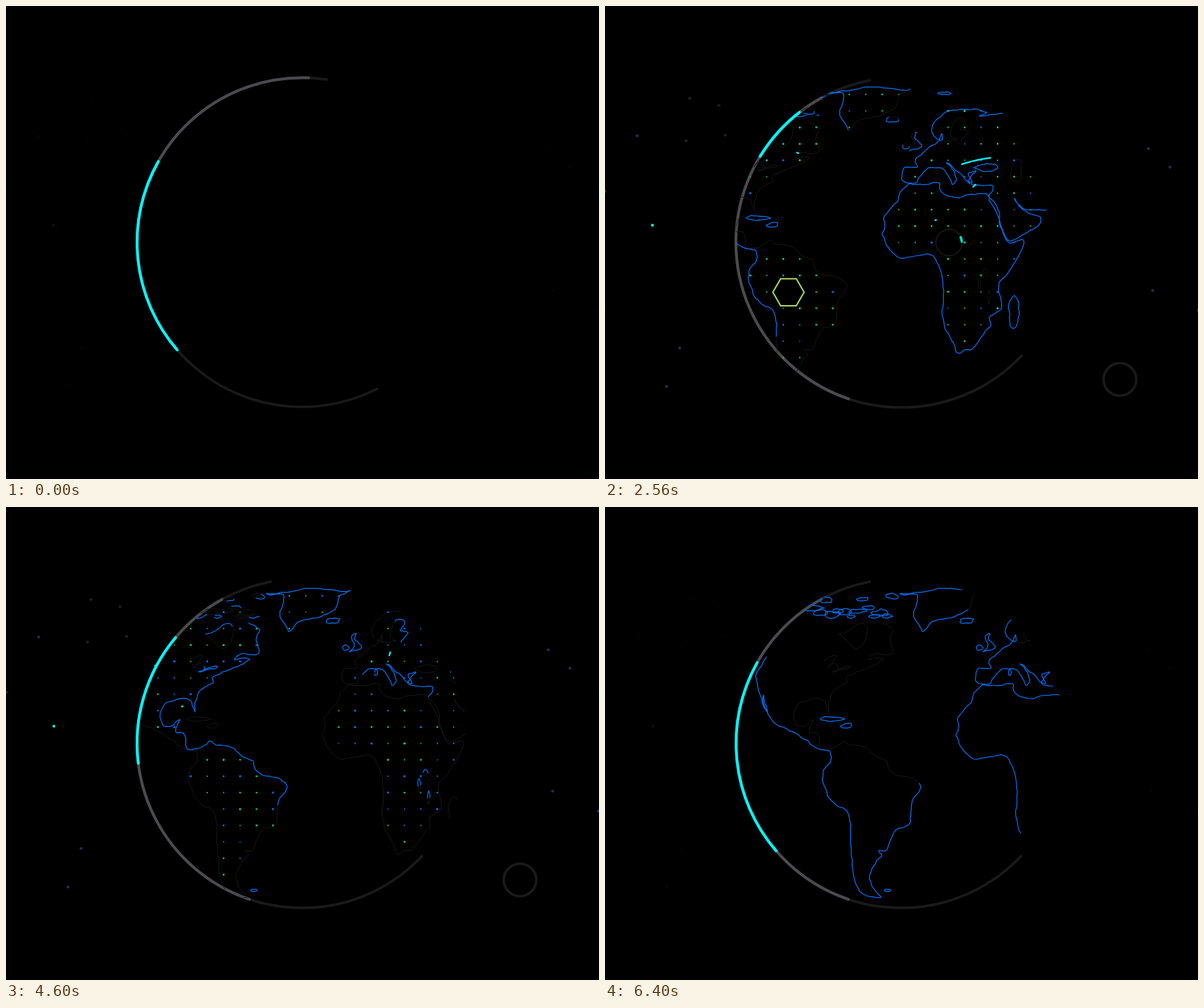
An HTML page with a canvas for the animation above (6.44 s loop, 837 px wide and 669 px high).

```html
<!DOCTYPE html>
<html lang="en">
<head>
<meta charset="utf-8">
<title>Globe</title>
<style>
  html, body { margin: 0; width: 100%; height: 100%; overflow: hidden; background: #000; }
  canvas { display: block; }
</style>
</head>
<body>
<canvas id="stage" width="837" height="669"></canvas>
<script>
const ctx = document.getElementById('stage').getContext('2d');
const LOOP = 6.44, START = 1.24, TRACE = .8, TAU = Math.PI * 2;
const CYAN = '#00f8fa', BLUE = '#0070f5', TEAL = '#00c890', DARK = '#1a1a1a', MID = '#4b4b4f';
const GLOBE = { x: 417.8, y: 334.2, r: 232.8 };
const PIVOT = { x: 269, y: 291 };
const GRID = 23.2;

const clamp = (v, a = 0, b = 1) => Math.min(b, Math.max(a, v));
const ramp = (t, a, b) => clamp((t - a) / (b - a));
const rad = deg => deg * Math.PI / 180;
const hash = (a, b) => {
  const s = Math.sin(a * 127.1 + b * 311.7) * 43758.5453;
  return s - Math.floor(s);
};

function seeded(seed) {
  let n = 0;
  return (a = 0, b = 1) => a + (b - a) * hash(seed, ++n);
}

// "x,y x,y" to pairs
const pairs = text => text.trim().split(/\s+/).map(p => p.split(',').map(Number));

// Smooth subdivision with a little noise gives a natural shoreline
function shore(points, seed) {
  const rand = seeded(seed);
  for (let pass = 0; pass < 3; pass++) {
    const next = [points[0]];
    for (let i = 1; i < points.length; i++) {
      const b = points[i - 1], c = points[i];
      const a = points[i - 2] || b, d = points[i + 1] || c;
      const reach = Math.hypot(c[0] - b[0], c[1] - b[1]) * .09;
      next.push([0, 1].map(k => (9 * (b[k] + c[k]) - a[k] - d[k]) / 16 + rand(-reach, reach)), c);
    }
    points = next;
  }
  return points;
}

function toPath(points) {
  const path = new Path2D();
  points.forEach(p => path.lineTo(...p));
  return path;
}

const coasts = [];

// Each cycle holds the times at which the blue trace enters and leaves
function coast(points, ...cycles) {
  const line = shore(points, coasts.length + 3);
  let length = 0;
  line.forEach((p, i) => { if (i) length += Math.hypot(p[0] - line[i - 1][0], p[1] - line[i - 1][1]); });
  coasts.push({ path: toPath(line), length, cycles, east: points[0][0] > 540 });
  return line;
}

function isle(x, y, rx, ry, ...cycles) {
  const rand = seeded(x + y);
  const ring = Array.from({ length: 8 }, (_, i) => {
    const r = rand(.65, 1.15);
    return [x + Math.cos(i * TAU / 8) * rx * r, y + Math.sin(i * TAU / 8) * ry * r];
  });
  return coast([...ring, ring[0]], ...cycles);
}

const africa = coast(pairs(`565,275 563,267 541,266 521,271 497,261 495,250 468,252 452,252
  439,267 437,275 418,297 418,315 415,324 428,347 443,357 470,352 487,354 500,389 499,430
  518,487 530,486 545,481 567,453 567,438 583,424 579,392 602,362 614,332 596,335 584,316 565,275`),
  [1.7, 3.4], [5.95, 9]);

const arabia = coast(pairs('564,268 580,292 592,331 627,316 637,298 617,290 601,272 618,288 646,289'),
  [1.7, 3.7]);

const europe = coast(pairs(`565,268 570,254 536,250 547,234 536,237 541,250 518,233 505,222
  519,244 513,252 502,232 489,229 480,229 467,242 463,250 449,250 442,244 447,228 464,228
  462,216 478,203 492,193 499,181 499,190 486,181 487,167 512,148 544,146 562,151 552,156 584,152`),
  [1.7, 2.6], [4.25, 6.35]);

const atlantic = coast(pairs(`363,391 347,382 323,374 317,359 301,352 287,340 266,337 256,331
  248,337 224,342 219,320 208,318 214,301 205,308 192,310 186,294 197,276 229,274 235,290
  238,270 259,250 260,241 281,231 297,225 312,215 291,216 303,207 325,207 322,185 326,173 311,164`),
  [3.62, 5.4]);

const pacific = coast(pairs(`147,212 132,240 149,291 143,266 162,308 189,320 221,342 237,346
  237,362 227,382 244,420 262,432 266,470 269,512 285,548 309,552 296,536 296,512 310,494
  306,486 318,484 329,458 350,447 353,416 364,400 363,391`),
  [2.12, 3.84], [5.5, 9]);

const greenland = coast(pairs(`454,118 390,115 336,122 360,124 355,148 367,176 382,162
  405,157 433,145 440,125 454,118`), [2.05, 4.7], [5.7, 9]);

// Hudson Bay, Great Lakes, Baltic, Britain
coast(pairs('250,180 279,165 290,172 286,190 272,200 250,180'), [4.3, 5.3]);
coast(pairs('228,217 247,211 234,228 242,221 249,229 241,233 267,226 248,229'), [2.6, 4.2]);
coast(pairs('497,190 520,189 511,184 519,160 531,162 525,175 536,178 526,191'), [2.6, 4.2]);
coast(pairs('453,205 470,199 461,188 463,179 456,183 460,195 453,205'), [2.1, 9]);

isle(448, 199, 5, 4, [2.1, 9]);
isle(430, 161, 12, 4, [2.1, 9]);
isle(503, 124, 9, 2, [1.7, 4.6]);
isle(491, 234, 2, 5, [2.6, 4.2], [4.3, 9]);
isle(319, 542, 5, 2, [2.6, 9]);
isle(238, 300, 19, 4, [1.7, 3.8], [5.6, 9]);
isle(260, 310, 9, 4, [1.7, 3.8], [5.6, 9]);
isle(562, 229, 17, 7, [1.7, 2.6]);
isle(603, 233, 10, 18, [2.6, 4.2]);
isle(601, 434, 8, 23, [1.7, 3.9]);
isle(560, 376, 4, 4, [2.6, 4.2]);
isle(552, 393, 2, 10, [2.6, 4.2]);
isle(565, 411, 2, 9, [2.6, 4.2]);

// Arctic archipelago
for (let i = 0; i < 14; i++) {
  const rand = seeded(i + 60);
  const x = 215 + i * 8.5;
  isle(x, rand(126, 158), rand(6, 15), rand(2, 6), [rand(1.8, 2.6), rand(3.3, 4.2)], [rand(4.2, 4.8), 9]);
}

const lands = [
  africa, arabia, greenland,
  [...europe, [600, 180], [645, 270]],
  [...atlantic, [325, 140], [290, 135], [200, 170], ...pacific]
].map(toPath);

// Grid points that fall on land
const dots = [];
for (let col = -3; col < 19; col++) {
  for (let row = 0; row < 18; row++) {
    const x = 206 + col * GRID, y = 125.6 + row * GRID;
    if (lands.some(land => ctx.isPointInPath(land, x, y))) {
      dots.push({ x, y, tint: hash(col + 5, row + 7), size: hash(col + 40, row + 1) });
    }
  }
}

const STARS = {
  '#1b3152': pairs('46,184 106,483 87.5,537.5 765.5,202 796,228 771.5,402 836,430'),
  '#202020': pairs('120,131 161,141 115,191 170,183 1,262'),
  '#00eee6': pairs('67.5,310')
};

// Middle time, start, end and bow
const FLIGHTS = [
  [1.4, 398, 311, 446, 311, 15],
  [2.56, 503, 224, 543, 215, 2],
  [3.44, 400, 298, 456, 311, 22],
  [3.44, 317, 186, 338, 170, 2],
  [4.08, 239, 303, 319, 352, 59],
  [4.08, 247, 195, 261, 191, 0]
];

function arc(x, y, r, from, to, color, width) {
  ctx.beginPath();
  ctx.arc(x, y, r, rad(from), rad(to));
  ctx.strokeStyle = color;
  ctx.lineWidth = width;
  ctx.stroke();
}

function disc(x, y, r, color) {
  ctx.fillStyle = color;
  ctx.beginPath();
  ctx.arc(x, y, r, 0, TAU);
  ctx.fill();
}

const globeArc = (from, to, color, width) => arc(GLOBE.x, GLOBE.y, GLOBE.r, from, to, color, width);

function drawTrace(shape, a, b) {
  if (b - a < .002) return;
  ctx.setLineDash([shape.length * (b - a), shape.length * 2]);
  ctx.lineDashOffset = -shape.length * a;
  ctx.stroke(shape.path);
  ctx.setLineDash([]);
}

function drawMap(t) {
  ctx.save();
  ctx.beginPath();
  ctx.arc(GLOBE.x, GLOBE.y, GLOBE.r + 1, 0, TAU);
  ctx.clip();
  ctx.translate(27.2 * (t - 3.44) + Math.min(0, t - 2.56), 0);
  ctx.lineJoin = 'round';
  ctx.strokeStyle = DARK;
  ctx.lineWidth = .95;
  for (const c of coasts) {
    ctx.globalAlpha = c.east ? 1 - ramp(t, 5.8, 6.36) : 1;
    ctx.stroke(c.path);
  }
  ctx.globalAlpha = 1;
  ctx.strokeStyle = BLUE;
  ctx.lineWidth = 1.2;
  for (const c of coasts) {
    for (const [enter, leave] of c.cycles) {
      drawTrace(c, ramp(t, leave, leave + TRACE), ramp(t, enter, enter + TRACE));
    }
  }
  drawDots(t);
  ctx.restore();
}

function drawDots(t) {
  const grown = ramp(t, 1.6, 2.56);
  const teal = grown * (.48 + .27 * Math.cos(TAU * (t - 2.56) / 2.8));
  const size = (.75 + .45 * grown) * (1 - ramp(t, 4.7, 6.35));
  for (const d of dots) {
    disc(d.x, d.y, size * (1 + grown * (d.size - .5) * .6), d.tint < teal ? TEAL : BLUE);
  }
}

// Draws itself in, then out, along a bowed line
function flight(t, mid, life, x0, y0, x1, y1, bow) {
  const p = (t - mid) / life + .5;
  if (p <= 0 || p >= 1) return;
  const dx = x1 - x0, dy = y1 - y0, k = bow / Math.hypot(dx, dy);
  const cx = (x0 + x1) / 2 + dy * k, cy = (y0 + y1) / 2 - dx * k;
  const from = clamp(p * 2 - 1), to = clamp(p * 2);
  ctx.beginPath();
  for (let i = 0; i <= 20; i++) {
    const u = from + (to - from) * i / 20, v = 1 - u;
    ctx.lineTo(v * v * x0 + 2 * u * v * cx + u * u * x1, v * v * y0 + 2 * u * v * cy + u * u * y1);
  }
  ctx.stroke();
}

function drawFlights(t) {
  ctx.strokeStyle = CYAN;
  ctx.lineWidth = 2.3;
  for (const [mid, ...line] of FLIGHTS) flight(t, mid, .9, ...line);
  // Short sparks
  for (let i = 0; i < 20; i++) {
    const rand = seeded(i + 200);
    const x = rand(160, 660), y = rand(190, 310), a = rand(0, TAU);
    flight(t, 2.2 + i * .17, .5, x, y, x + Math.cos(a) * 5, y + Math.sin(a) * 5, 0);
  }
}

// Grow, hold and fade a marker around its middle time
function marker(t, mid, x, y, draw) {
  const d = t - mid;
  if (Math.abs(d) > .45) return;
  const grow = 1 - Math.pow(1 - ramp(d, -.45, -.05), 3);
  ctx.save();
  ctx.translate(x, y);
  ctx.scale(grow, grow);
  ctx.globalAlpha = 1 - ramp(d, .1, .45);
  draw(d);
  ctx.restore();
}

function hexagon(r, turn, color) {
  ctx.beginPath();
  for (let i = 0; i < 6; i++) {
    const a = rad(turn + i * 60);
    ctx.lineTo(Math.cos(a) * r, Math.sin(a) * r);
  }
  ctx.closePath();
  ctx.fillStyle = '#000';
  ctx.fill();
  ctx.strokeStyle = color;
  ctx.lineWidth = 2;
  ctx.stroke();
}

function drawMarkers(t) {
  marker(t, 2.56, 259, 404.5, d => hexagon(22, d * 60, '#a9d65c'));
  marker(t, 2.56, 485, 334.5, d => {
    disc(0, 0, 18.5, '#000');
    arc(0, 0, 18.5, 0, 360, DARK, 1.6);
    arc(0, 0, 18, -25 + d * 300, -5 + d * 300, '#00e0c8', 3.5);
  });
  marker(t, 4.08, 308, 224, d => hexagon(21.3, 32 + d * 60, CYAN));
}

function drawStars(alpha) {
  ctx.globalAlpha = alpha;
  for (const [color, list] of Object.entries(STARS)) {
    for (const [x, y] of list) disc(x, y, 2.1, color);
  }
  ctx.globalAlpha = 1;
}

// Rings spin away, then the bright arc goes dark
function drawOutro(t) {
  const spin = 1 - Math.exp(-6 * (t + .04));
  const drift = 1 - Math.exp(-5 * t);
  drawStars(.1);
  ctx.globalAlpha = 1 - ramp(t, .25, .68);
  globeArc(43.3 + 90 * spin, 259 + 90 * spin, DARK, 3.6);
  globeArc(108.6 + 143 * spin, 241.1 + 143 * spin, MID, 4);
  ctx.globalAlpha = 1 - ramp(t, .7, .98);
  globeArc(139.2 - 6.8 * drift, 209.4 - .7 * drift, CYAN, 4);
  ctx.globalAlpha = 1;
}

function drawScene(t) {
  const zoom = 1 + 2.711 * Math.exp(-5.9 * (t - 1.4));
  const out = ramp(t, 6, 6.38);
  ctx.save();
  ctx.translate(PIVOT.x, PIVOT.y);
  ctx.scale(zoom, zoom);
  ctx.translate(-PIVOT.x, -PIVOT.y);
  drawStars(1 - .9 * out);
  ctx.globalAlpha = 1 - out;
  arc(725.5, 527.5, 23, 0, 360, DARK, 3.6);
  ctx.globalAlpha = 1;
  globeArc(43.3, 259, DARK, 3.6);
  globeArc(108.6, 241.1, MID, 4);
  drawMap(t);
  globeArc(211.4 - 18.8 * (t - 2.56), 232 - 5.9 * (t - 2.56), CYAN, 4);
  drawFlights(t);
  drawMarkers(t);
  ctx.restore();
}

function frame() {
  const t = (performance.now() / 1000 - begin) % LOOP;
  ctx.globalAlpha = 1;
  ctx.fillStyle = '#000';
  ctx.fillRect(0, 0, 837, 669);
  ctx.lineCap = 'round';
  if (t < START) drawOutro(t);
  else drawScene(t);
  requestAnimationFrame(frame);
}

const begin = performance.now() / 1000;
frame();
</script>
</body>
</html>
```
